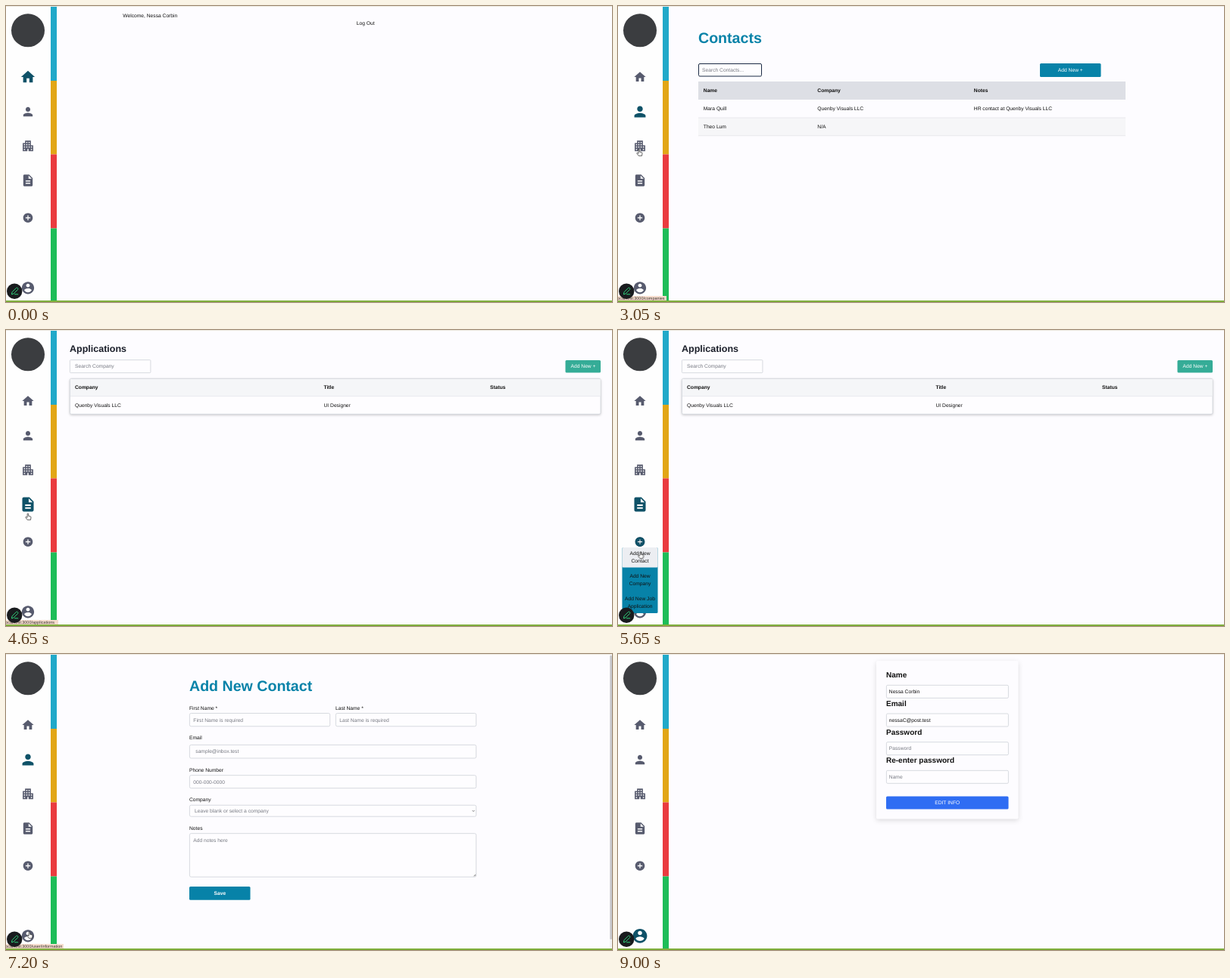
Animation of 800x392 px, one loop 9.05 s. Source, as an HTML page:

```html
<!DOCTYPE html>
<html lang="en">
<head>
<meta charset="utf-8">
<title>Job tracker tour</title>
<style>
html, body { margin: 0; width: 100%; height: 100%; overflow: hidden; background: #fdfcff; }
svg { display: block; width: 100%; height: 100%; }
text { font: 6.7px "Liberation Sans", Arial, sans-serif; fill: #111; text-rendering: geometricPrecision; }
.b { font-weight: 700; }
.h10 { font-size: 10px; font-weight: 700; }
.h12 { font-size: 12.5px; font-weight: 700; fill: #1b1f2a; }
.h20 { font-size: 19.6px; font-weight: 700; fill: #0782a8; }
.ph { fill: #777a82; }
.mid { text-anchor: middle; }
.btn { text-anchor: middle; fill: #fff; }
.tip text { font-size: 5.5px; fill: #3a3330; }
.tip rect { fill: #f5dccd; }
.nav { fill: #575b6e; }
.on { fill: #0f5268; }
.teal { fill: #0782a8; }
.blue { fill: #2f6df3; }
.patch { fill: #fefefe; }
.in { fill: #fefdff; stroke: #d3d6dc; stroke-width: .9; }
.soft { filter: drop-shadow(0 1px 1.5px #0003); }

/* one loop */
.a { animation: 9.05s step-end infinite; }
.home { animation-name: home; }
.contacts { animation-name: contacts; }
.companies { animation-name: companies; }
.apps { animation-name: apps; }
.form { animation-name: form; }
.profile { animation-name: profile; }
.menu { animation-name: menu; }
.hover { animation-name: hover; }
.t1 { animation-name: t1; }
.t2 { animation-name: t2; }
.t3 { animation-name: t3; }
.t4 { animation-name: t4; }
.t5 { animation-name: t5; }
.hand { animation-name: hand; }
.arrow { animation-name: arrow; }
.cursor { animation: move 9.05s ease-in-out infinite; }

@keyframes home { 0% { visibility: visible } 23.757%, 100% { visibility: hidden } }
@keyframes contacts { 0%, 37.017%, 100% { visibility: hidden } 23.757% { visibility: visible } }
@keyframes companies { 0%, 47.514%, 100% { visibility: hidden } 37.017% { visibility: visible } }
@keyframes apps { 0%, 67.956%, 100% { visibility: hidden } 47.514% { visibility: visible } }
@keyframes form { 0%, 82.32%, 100% { visibility: hidden } 67.956% { visibility: visible } }
@keyframes profile { 0% { visibility: hidden } 82.32%, 100% { visibility: visible } }
@keyframes menu { 0%, 67.956%, 100% { visibility: hidden } 55.801% { visibility: visible } }
@keyframes hover { 0%, 67.956%, 100% { visibility: hidden } 59.67% { visibility: visible } }
@keyframes t1 { 0%, 20.442%, 100% { visibility: hidden } 11.602% { visibility: visible } }
@keyframes t2 { 0%, 29.834%, 100% { visibility: hidden } 21.547% { visibility: visible } }
@keyframes t3 { 0%, 42.6%, 100% { visibility: hidden } 31.492% { visibility: visible } }
@keyframes t4 { 0%, 52.486%, 100% { visibility: hidden } 43.094% { visibility: visible } }
@keyframes t5 { 0%, 85.635%, 100% { visibility: hidden } 76.796% { visibility: visible } }
@keyframes hand {
  0%, 19.9%, 28.7%, 40.3%, 51.4%, 70.7%, 84.5%, 100% { visibility: hidden }
  11%, 21.5%, 31.5%, 43.1%, 53.6%, 76.8% { visibility: visible }
}
@keyframes arrow {
  0%, 19.9%, 28.7%, 40.3%, 51.4%, 70.7%, 84.5%, 100% { visibility: visible }
  11%, 21.5%, 31.5%, 43.1%, 53.6%, 76.8% { visibility: hidden }
}
@keyframes move {
  0%, 2.76% { transform: translate(50px, 400px) }
  12.155%, 18.785% { transform: translate(25px, 97px) }
  22.652%, 27.624% { transform: translate(28px, 143px) }
  32.044%, 39.227% { transform: translate(28px, 190px) }
  41.989% { transform: translate(28px, 217px) }
  44.199%, 49.724% { transform: translate(29px, 232px) }
  54.696%, 57.459% { transform: translate(29px, 279px) }
  60.773%, 69.061% { transform: translate(29.5px, 294px) }
  77.348%, 83.425% { transform: translate(31px, 368px) }
  87.293%, 100% { transform: translate(45px, 400px) }
}
</style>
</head>
<body>
<svg viewBox="0 0 800 392">
<defs>
  <g id="house"><path transform="translate(-12 -12)" d="M10 20v-6h4v6h5v-8h3L12 3 2 12h3v8z"/></g>
  <g id="person"><path transform="translate(-12 -12)" d="M12 12c2.21 0 4-1.79 4-4s-1.79-4-4-4-4 1.79-4 4 1.79 4 4 4zm0 2c-2.67 0-8 1.34-8 4v2h16v-2c0-2.66-5.33-4-8-4z"/></g>
  <g id="tower"><path transform="translate(-12 -12)" d="M17 11V3H7v4H3v14h8v-4h2v4h8V11h-4zM7 19H5v-2h2v2zm0-4H5v-2h2v2zm0-4H5V9h2v2zm4 4H9v-2h2v2zm0-4H9V9h2v2zm0-4H9V5h2v2zm4 8h-2v-2h2v2zm0-4h-2V9h2v2zm0-4h-2V5h2v2zm4 12h-2v-2h2v2zm0-4h-2v-2h2v2z"/></g>
  <g id="doc"><path transform="translate(-12 -12)" d="M14 2H6c-1.1 0-2 .9-2 2v16c0 1.1.9 2 2 2h12c1.1 0 2-.9 2-2V8l-6-6zm2 16H8v-2h8v2zm0-4H8v-2h8v2zm-3-5V3.5L18.5 9H13z"/></g>
  <g id="plus"><path transform="translate(-12 -12)" d="M12 2C6.48 2 2 6.48 2 12s4.48 10 10 10 10-4.48 10-10S17.52 2 12 2zm5 11h-4v4h-2v-4H7v-2h4V7h2v4h4v2z"/></g>
  <g id="account"><path transform="translate(-12 -12)" d="M12 2C6.48 2 2 6.48 2 12s4.48 10 10 10 10-4.48 10-10S17.52 2 12 2zm0 3c1.66 0 3 1.34 3 3s-1.34 3-3 3-3-1.34-3-3 1.34-3 3-3zm0 14.2c-2.5 0-4.71-1.28-6-3.22.03-1.99 4-3.08 6-3.08 1.99 0 5.97 1.09 6 3.08-1.29 1.94-3.5 3.22-6 3.22z"/></g>
  <g id="scroll">
    <rect x="797" width="3" height="390" fill="#f3f3f5"/>
    <rect x="797.3" y="2" width="2.7" height="376" rx="1.3" fill="#c6c6c9"/>
  </g>
</defs>

<rect width="800" height="392" fill="#fdfcff"/>
<rect width="59" height="390" fill="#fefefe"/>
<circle cx="29" cy="32.3" r="22" fill="#3b3d40"/>
<g class="nav">
  <use href="#house" transform="translate(29 94) scale(.76)"/>
  <use href="#person" transform="translate(29 140) scale(.77)"/>
  <use href="#tower" transform="translate(29 185.3) scale(.77)"/>
  <use href="#doc" transform="translate(29 231) scale(.77)"/>
  <use href="#plus" transform="translate(29 280.5) scale(.63)"/>
  <use href="#account" transform="translate(29 373.3) scale(.81)"/>
</g>
<rect x="59" y="1" width="8" height="98" fill="#20a9c9"/>
<rect x="59" y="99" width="8" height="97.5" fill="#e2a616"/>
<rect x="59" y="196.500" width="8" height="98" fill="#ea3b3f"/>
<rect x="59" y="294.500" width="8" height="96" fill="#1dbd58"/>

<g class="a home">
  <rect class="patch" x="18" y="82" width="22" height="22"/>
  <use class="on" href="#house" transform="translate(29 94) scale(.91)"/>
  <text x="154.300" y="14.800">Welcome, Nessa Corbin</text>
  <text x="462.800" y="24.800">Log Out</text>
</g>

<g class="a contacts">
  <rect class="patch" x="18" y="128" width="22" height="24"/>
  <use class="on" href="#person" transform="translate(29 140) scale(.93)"/>
  <text class="h20" x="106" y="48.700">Contacts</text>
  <rect x="106.500" y="76.500" width="83" height="16.500" rx="1.500" fill="#fefdff" stroke="#1b2a44"/>
  <text class="ph" x="111" y="87.300">Search Contacts...</text>
  <rect class="teal" x="557" y="76" width="80.500" height="18" rx="1.500"/>
  <text class="btn" x="597.300" y="87.300">Add New +</text>
  <rect x="106" y="100" width="564" height="24" fill="#dddfe5"/>
  <rect x="106" y="148" width="564" height="24" fill="#f6f6f8"/>
  <path d="M106 148h564M106 171.800h564" stroke="#e1e1e6" stroke-width=".7"/>
  <g class="b">
    <text class="b" x="112.800" y="114.200">Name</text>
    <text class="b" x="263.300" y="114.200">Company</text>
    <text class="b" x="469.800" y="114.200">Notes</text>
  </g>
  <text x="112.800" y="137.800">Mara Quill</text>
  <text x="263.300" y="137.800">Quenby Visuals LLC</text>
  <text x="469.800" y="137.800">HR contact at Quenby Visuals LLC</text>
  <text x="112.800" y="162">Theo Lum</text>
  <text x="263.300" y="162">N/A</text>
</g>

<g class="a companies">
  <rect class="patch" x="18" y="174" width="22" height="23"/>
  <use class="on" href="#tower" transform="translate(29 185.300) scale(.94)"/>
  <rect x="74" y="8" width="715" height="382" fill="#edeef2"/>
  <text class="h10" x="84" y="27.700">Companies</text>
  <rect class="in" x="84.400" y="38.400" width="347" height="16.700" rx="2.500"/>
  <text class="ph" x="87.500" y="48.800">Search companies...</text>
  <rect class="blue" x="738" y="38" width="41" height="17.500" rx="2.500"/>
  <text class="btn" x="758.500" y="48.500">Add New</text>
  <g class="soft">
    <rect x="84" y="62" width="695" height="48" rx="2" fill="#fdfcff"/>
    <path d="M84 86V64q0-2 2-2h691q2 0 2 2v22z" fill="#dddfe4"/>
  </g>
  <text class="b" x="91" y="76.200">Company Name</text>
  <text class="b" x="318" y="76.200">Notes</text>
  <text x="91" y="100.300">Quenby Visuals LLC</text>
  <text x="318" y="100.300">Submitted application for the UI Designer role.</text>
  <use href="#scroll"/>
</g>

<g class="a apps">
  <rect class="patch" x="18" y="219" width="22" height="24"/>
  <use class="on" href="#doc" transform="translate(29 231) scale(.94)"/>
  <text class="h12" x="84" y="29.400">Applications</text>
  <rect class="in" x="84.400" y="39.700" width="106.500" height="17" rx="1"/>
  <text class="ph" x="91" y="50.300">Search Company</text>
  <rect x="738.500" y="40" width="46.500" height="16.500" rx="1.500" fill="#35ac97"/>
  <text class="btn" x="762" y="50.300">Add New +</text>
  <rect class="in soft" x="84.400" y="64.400" width="700.600" height="47" rx="2"/>
  <rect x="85" y="65" width="699.500" height="22.500" fill="#f5f6f8"/>
  <path d="M85 87.700h699.500" stroke="#e2e4ea" stroke-width=".8"/>
  <text class="b" x="91" y="78">Company</text>
  <text class="b" x="419.500" y="78">Title</text>
  <text class="b" x="639" y="78">Status</text>
  <text x="91" y="102">Quenby Visuals LLC</text>
  <text x="419.500" y="102">UI Designer</text>
</g>

<g class="a form">
  <rect class="patch" x="18" y="128" width="22" height="24"/>
  <use class="on" href="#person" transform="translate(29 140) scale(.93)"/>
  <text class="h20" x="242" y="48.700">Add New Contact</text>
  <text x="242" y="74">First Name *</text>
  <text x="435" y="74">Last Name *</text>
  <text x="242" y="113.300">Email</text>
  <text x="242" y="156">Phone Number</text>
  <text x="242" y="195">Company</text>
  <text x="242" y="232.800">Notes</text>
  <g class="in">
    <rect x="242.400" y="78.500" width="185.300" height="17.300" rx="2"/>
    <rect x="435.400" y="78.500" width="185.300" height="17.300" rx="2"/>
    <rect x="242.400" y="120.400" width="378.300" height="17.600" rx="2"/>
    <rect x="242.400" y="160.700" width="378.300" height="17" rx="2"/>
    <rect x="242.400" y="200.200" width="378.300" height="15" rx="2"/>
    <rect x="242.400" y="237.700" width="378.300" height="57.500" rx="2"/>
  </g>
  <path d="M615.600 207l1.500 1.600 1.500-1.600M617.500 294.300l2.500-2.500M619 294.300l1-1" fill="none" stroke="#666" stroke-width=".8"/>
  <text class="ph" x="247.300" y="89.500">First Name is required</text>
  <text class="ph" x="440.300" y="89.500">Last Name is required</text>
  <text class="ph" x="250.300" y="131.300">sample@inbox.test</text>
  <text class="ph" x="247.300" y="171.500">000-000-0000</text>
  <text class="ph" x="249" y="210.200">Leave blank or select a company</text>
  <text class="ph" x="247.300" y="248.500">Add notes here</text>
  <rect class="teal" x="242" y="308" width="80.500" height="17.700" rx="1.500"/>
  <text class="btn b" x="282.300" y="319.200">Save</text>
  <use href="#scroll"/>
</g>

<g class="a profile">
  <rect class="patch" x="18" y="362" width="22" height="23"/>
  <use class="on" href="#account" transform="translate(29 373.300) scale(.94)"/>
  <rect x="341" y="9" width="187.500" height="209.500" rx="2" fill="#fdfcff" style="filter: drop-shadow(0 2px 3px #0002)"/>
  <text class="h10" x="354" y="31.200">Name</text>
  <text class="h10" x="354" y="69">Email</text>
  <text class="h10" x="354" y="106.600">Password</text>
  <text class="h10" x="354" y="144.300">Re-enter password</text>
  <g class="in">
    <rect x="354.400" y="41.300" width="161" height="17" rx="1.500"/>
    <rect x="354.400" y="79" width="161" height="17" rx="1.500"/>
    <rect x="354.400" y="116.700" width="161" height="17" rx="1.500"/>
    <rect x="354.400" y="154.300" width="161" height="17" rx="1.500"/>
  </g>
  <text x="357.800" y="52">Nessa Corbin</text>
  <text x="357.800" y="89.700">nessaC@post.test</text>
  <text class="ph" x="357.800" y="127.400">Password</text>
  <text class="ph" x="357.800" y="165">Name</text>
  <rect class="blue" x="354" y="188.500" width="161.500" height="17" rx="1.500"/>
  <text class="btn" x="434.700" y="199.200">EDIT INFO</text>
</g>

<g class="a menu">
  <use class="on" href="#plus" transform="translate(29 280.500) scale(.63)"/>
  <rect class="teal" x="5.500" y="288" width="47" height="87" rx="1.500"/>
  <rect class="a hover" x="5.500" y="288" width="47" height="26.500" rx="1.500" fill="#eceef2"/>
  <text class="mid" x="29" y="298.200">Add New</text>
  <text class="mid" x="29" y="308.200">Contact</text>
  <text class="mid" x="29" y="328.200">Add New</text>
  <text class="mid" x="29" y="338.300">Company</text>
  <text class="mid" x="29" y="358.300">Add New Job</text>
  <text class="mid" x="29" y="368.400">Application</text>
</g>

<g class="tip">
  <g class="a t1"><rect y="384" width="52" height="6.500"/><text x="-2" y="389.300">localhost:3000/home</text></g>
  <g class="a t2"><rect y="384" width="60" height="6.500"/><text x="-2" y="389.300">localhost:3000/contacts</text></g>
  <g class="a t3"><rect y="384" width="64" height="6.500"/><text x="-2" y="389.300">localhost:3000/companies</text></g>
  <g class="a t4"><rect y="384" width="69" height="6.500"/><text x="-2" y="389.300">localhost:3000/applications</text></g>
  <g class="a t5"><rect y="384" width="76" height="6.500"/><text x="-2" y="389.300">localhost:3000/user/information</text></g>
</g>

<rect width="800" height="1" fill="#ece8e0"/>
<rect y="390" width="800" height="2" fill="#7fae3c"/>

<!-- edit button -->
<circle cx="11.200" cy="377.700" r="10.200" fill="#191b1e"/>
<path d="M7.500 381.500l.6-2.700 5.400-5.400q1-.7 1.900.2t.2 1.900l-5.400 5.400zM11.500 381.800h4.300" fill="none" stroke="#2fd07a" stroke-width="1" stroke-linejoin="round" stroke-linecap="round"/>

<g class="cursor" stroke-linejoin="round">
  <path class="a arrow" d="M0 0v6.600l1.500-1.400 1.100 2.400 1.200-.5-1.100-2.400h2.100z" fill="#111" stroke="#fff" stroke-width=".6"/>
  <path class="a hand" d="M-.9.800q0-.9.800-.9t.8.900v2.500l2.400.5q1 .3.900 1.300l-.5 3.300h-4.200l-2.300-3q-.5-.9.400-1l1.700.9z" fill="#fff" stroke="#222" stroke-width=".7"/>
</g>
</svg>
</body>
</html>
```
